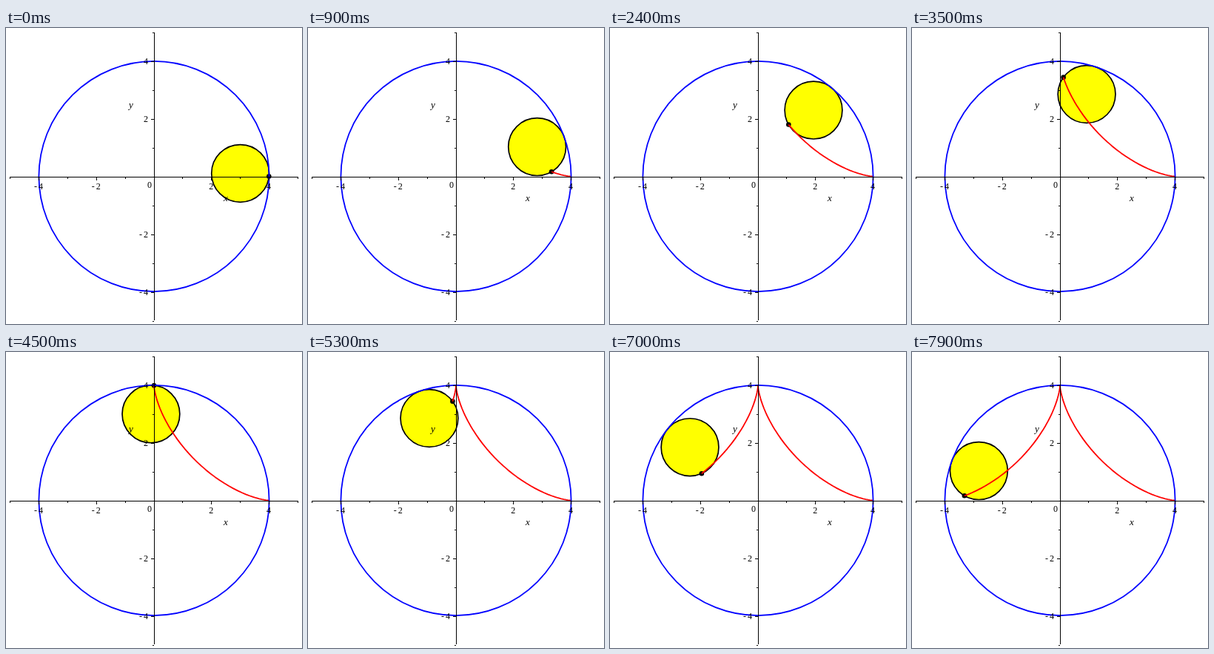
An HTML page that plays this animation: 400x400 px, repeating every 8 s.

```html
<!DOCTYPE html>
<html lang="en">
<head>
<meta charset="utf-8">
<title>Circle rolling inside a circle</title>
<style>
  html, body { margin: 0; width: 100%; height: 100%; overflow: hidden; background: #fff; }
  svg { display: block; width: 100vw; height: 100vh; }
  text { font: 12px "Liberation Serif", "Times New Roman", serif; text-anchor: middle; }
  .name { font-size: 13px; font-style: italic; }
</style>
</head>
<body>
<svg viewBox="0 0 400 400">
  <circle id="wheel" fill="#ff0" stroke="#000" stroke-width="1.7"/>
  <circle id="dot" r="3.3"/>
  <path id="trace" fill="none" stroke="#f00" stroke-width="1.8" stroke-linejoin="round"/>
  <circle id="ring" fill="none" stroke="#00f" stroke-width="1.8"/>
  <g id="axes"></g>
</svg>
<script>
  const UNIT = 38.9, OX = 200, OY = 200.5;
  const STEP_MS = 100, STEPS = 80, STEP_ANGLE = Math.PI / 90;
  const byId = id => document.getElementById(id);
  const px = x => OX + x * UNIT;
  const py = y => OY - y * UNIT;

  function add(tag, attrs, content = '') {
    const el = document.createElementNS('http://www.w3.org/2000/svg', tag);
    set(el, attrs);
    el.textContent = content;
    byId('axes').append(el);
  }

  function set(el, attrs) {
    for (const key in attrs) el.setAttribute(key, attrs[key]);
  }

  const bar = (x, y, width, height) => add('rect', { x, y, width, height });
  const label = (x, y, s, cls = '') => add('text', { x, y, class: cls }, s);

  function number(x, y, n) {
    label(x, y, Math.abs(n));
    if (n < 0) label(x - 7, y, '-');
  }

  function drawAxes() {
    bar(5, 201, 390, 1);
    bar(200, 6, 1, 389);
    for (let n = -5; n <= 5; n++) {
      if (!n) continue;
      const major = n % 2 === 0;
      const length = major ? 4 : 2;
      bar(Math.floor(px(n)), 202, 1, length);
      bar(200 - length, Math.floor(py(n)) + (n < 5 ? 1 : 0), length, 1);
      if (major) {
        number(px(n) + (n < 0 ? 2.5 : -0.5), 218, n);
        number(189, py(n) + 4.5, n);
      }
    }
    label(194, 216, '0');
    label(297, 234, 'x', 'name');
    label(169, 108, 'y', 'name');
  }

  const astroid = a => [px(4 * Math.cos(a) ** 3), py(4 * Math.sin(a) ** 3)];

  function draw(ms) {
    const step = Math.floor(ms / STEP_MS) % STEPS;
    const angle = (step + 1) * STEP_ANGLE;
    set(byId('wheel'), { cx: px(3 * Math.cos(angle)), cy: py(3 * Math.sin(angle)) });
    const points = Array.from({ length: step + 2 }, (_, i) => astroid(i * STEP_ANGLE));
    const [cx, cy] = points[points.length - 1];
    set(byId('dot'), { cx, cy });
    set(byId('trace'), { d: 'M' + points.map(p => p.map(v => v.toFixed(2))).join('L') });
  }

  set(byId('wheel'), { r: UNIT });
  set(byId('ring'), { cx: OX, cy: OY, r: 4 * UNIT });
  drawAxes();
  draw(0);

  const start = performance.now();
  function tick() {
    draw(performance.now() - start);
    requestAnimationFrame(tick);
  }
  requestAnimationFrame(tick);
</script>
</body>
</html>
```
